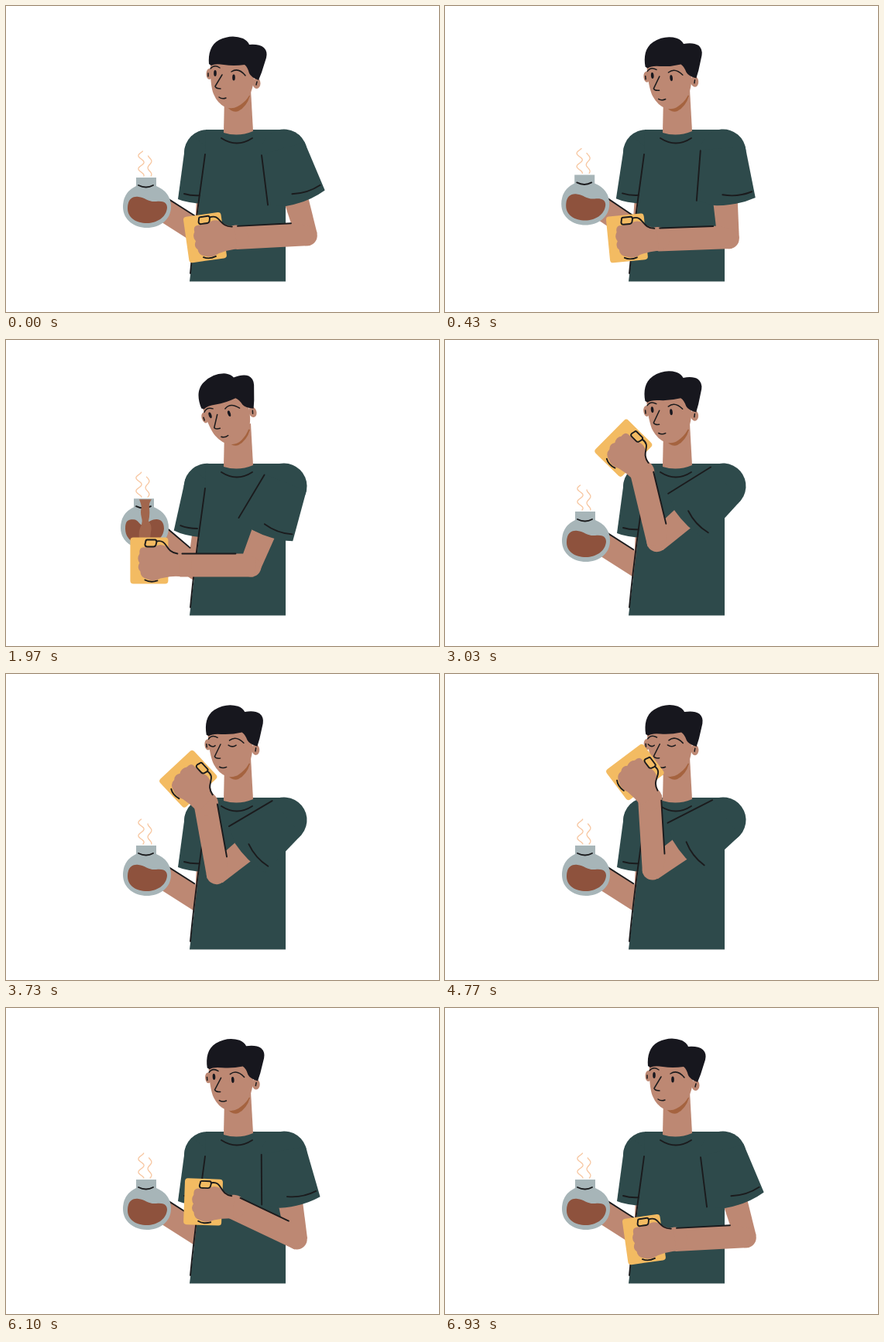
Recreate the animation shown at these times as an HTML page. Size 559 px wide and 396 px high, loop 7010 ms.

```html
<!DOCTYPE html>
<html lang="en">
<head>
<meta charset="utf-8">
<title>Coffee break</title>
<style>
html, body { margin: 0; width: 100%; height: 100%; overflow: hidden; background: #fff; }
svg { display: block; width: 100vw; height: 100vh; }
.skin { fill: #bd8873; }
.shirt { fill: #2e4a4b; }
.hair { fill: #17171e; }
.glass { fill: #a7b5b8; }
.mug { fill: #f3bb62; }
.line { fill: none; stroke: #1b1b1d; stroke-width: 1.9; stroke-linecap: round; stroke-linejoin: round; }
.thin { stroke-width: 1.5; }
.limb { fill: none; stroke: #bd8873; stroke-width: 30; stroke-linecap: round; }
.steam { fill: none; stroke: #f7c6a0; stroke-width: 1.3; stroke-linecap: round; }
</style>
</head>
<body>
<svg viewBox="0 0 559 396">
  <!-- pouring arm -->
  <path id="backUpper" class="limb" style="stroke-width:25"/>
  <g id="backFore">
    <path class="limb" d="M0 -1H72"/>
    <path class="line" d="M24 14H67"/>
  </g>
  <g id="backSleeve">
    <circle class="shirt" cx="260" cy="190" r="30"/>
    <path class="shirt" d="M231 183L222 250Q236 256 262 256L272 192L240 168Z"/>
    <path class="line" d="M230 243Q240 246 252 245"/>
  </g>

  <!-- body -->
  <path class="shirt" d="M258 160H359L361 166V356.500H237L257 192Z"/>
  <path class="line" d="M257 192C252 232 245 272 238 346"/>
  <path class="skin" d="M282 118L316 108L319 162Q300 170 281 164Z"/>
  <path fill="#a5633f" d="M284 129Q292 139 300 136Q311 130 315 116L298 112Z"/>
  <path class="line" d="M278 171Q298 184 318 171"/>

  <!-- head -->
  <g id="head">
    <ellipse class="skin" cx="262.500" cy="88" rx="4" ry="7"/>
    <ellipse class="skin" cx="323.500" cy="100" rx="5" ry="7"/>
    <path class="skin" d="M264 68C263 90 265 107 268 114Q273 126 283 131Q292 134 299 130C310 124 316 116 319 102L324 70Z"/>
    <path class="hair" d="M262 75C261 62 264 50 275 44Q291 36 306 42Q312 45 314 50Q327 49 333 54Q338 59 336 67L330 86L326 96Q316 92 314 87Q312 79 308 76Q294 78 281 76Q270 74 265 77Z"/>
    <path class="line thin" d="M264 81Q269 75 276 80M291 85Q300 79 309 90"/>
    <path class="line thin" d="M279 89L270 104Q271 107 277 107M275 118Q279 121 284 119M323 102L324 98M261 91L261 87"/>
    <g id="open" class="hair">
      <ellipse cx="270" cy="87" rx="1.800" ry="4"/>
      <ellipse cx="294" cy="92.500" rx="1.800" ry="4"/>
    </g>
    <path id="shut" class="line thin" d="M264 88Q268 93 272 90M289 91Q294 95 299 92"/>
  </g>

  <!-- carafe -->
  <g id="carafe">
    <path class="glass" d="M168 222H194V233Q213 241 213 260C213 277 198 287 182 287S151 277 151 260Q151 241 168 233Z"/>
    <path id="liquid" fill="#8e523d"/>
    <path class="line" d="M171 232Q181 237 190 232"/>
    <path id="steamA" class="steam"/>
    <path id="steamB" class="steam"/>
  </g>
  <path id="stream" fill="#a1664d" d="M-8 0H8Q4 6 5 14Q6 24 4 33Q9 40 7 50L6 60H-8Q-9 50 -7 44Q-3 36 -5 28Q-7 20 -5 12Q-6 5 -8 0Z"/>

  <!-- mug arm, pivots at the origin of each group -->
  <g id="upper">
    <path class="skin" d="M-18 58H14L12 113H-16Z"/>
    <circle class="shirt" r="29.500"/>
    <path class="shirt" d="M-29 -5L29 -5L37 62Q12 71 -17 68L-39 60Z"/>
    <path class="line" d="M-29 -4L-39 60M-5 55Q14 60 33 54"/>
  </g>
  <g id="fore">
    <circle class="skin" cx="-1" cy="1" r="13"/>
    <path class="skin" d="M-93 -16H-12L6 -10L2 14H-93Z"/>
    <g id="hand">
      <rect class="mug" x="-64" y="-35" width="49" height="60" rx="4"/>
      <path class="line" d="M-45 20Q-38 24 -29 21"/>
      <circle class="skin" r="15.500"/>
      <path class="skin" d="M-45 -22Q-53 -23 -52 -14Q-56 -8 -52 -2Q-56 4 -51 9Q-51 17 -42 19Q-34 23 -25 18Q-13 15 0 15V-14Q-11 -16 -17 -23Q-26 -28 -32 -23Z"/>
      <path class="line" style="fill:#f3bb62" d="M-42 -32H-32Q-30 -32 -30 -29L-31 -25Q-32 -23 -34 -23H-42Q-45 -23 -45 -26L-44 -30Q-44 -32 -42 -32Z"/>
      <path class="line" d="M-30 -30C-15 -33 -20 -16 -3 -14"/>
    </g>
    <path class="line" d="M-90 -16H-21"/>
  </g>
</svg>
<script>
const LOOP = 7010, FIRST = 100, STEP = 6830 / 98;
const SHOULDER = [359, 189], UPPER = 111.5;
const el = {};
document.querySelectorAll('[id]').forEach(n => el[n.id] = n);
const set = (id, name, value) => el[id].setAttribute(name, value);
const move = (id, value) => set(id, 'transform', value);

// [time, value] keys, eased between neighbours
const tracks = {
  upper: [[100, 16], [850, -21.9], [2370, -21.9], [3080, -49.5], [3400, -49.5], [4450, -54], [5450, -54], [6255, 16]],
  fore: [[100, -3], [850, 0], [2330, 0], [2470, -5], [3080, 78], [3400, 78], [4450, 86.5], [5450, 86.5], [6490, -3]],
  hand: [[100, -8], [850, 0], [2370, 0], [3080, 45.3], [3400, 45.3], [4450, 53], [5450, 53], [6327, -8]],
  head: [[100, 0], [850, -18], [2330, -18], [3080, -5.7], [4600, -4.5], [5800, -4.5], [6770, 0]],
  lift: [[100, 0], [1600, 1], [2270, 0]],
  pour: [[740, 0], [900, 1], [2060, 1], [2260, 0]]
};
const SHUT = [3700, 5150];

const ease = p => (1 - Math.cos(Math.PI * p)) / 2;
function at(name, t) {
  const keys = tracks[name];
  const i = keys.findIndex(k => k[0] > t);
  if (i === 0) return keys[0][1];
  if (i < 0) return keys[keys.length - 1][1];
  const [t0, a] = keys[i - 1], [t1, b] = keys[i];
  return a + (b - a) * ease((t - t0) / (t1 - t0));
}

// point (x, y) turned clockwise by deg
function turn(x, y, deg) {
  const r = deg * Math.PI / 180, c = Math.cos(r), s = Math.sin(r);
  return [x * c - y * s, x * s + y * c];
}

// both outlines have the same commands, so they blend number by number
const still = 'M157 262C157 250 163 246 171 247C180 248 184 254 194 253C204 252 208 255 208 261C207 274 194 281 182 281C168 281 157 274 157 262Z';
const tipped = 'M157 261C157 251 160 249 167 249C175 249 174 257 182 257C190 247 207 244 207 261C206 275 192 283 180 283C168 282 157 274 157 261Z';
function blend(a, b, k) {
  const nums = b.match(/\d+/g);
  let i = 0;
  return a.replace(/\d+/g, n => (+n + (nums[i++] - n) * k).toFixed(2));
}

function wave(x, top, size, phase) {
  let d = '';
  for (let y = top; y <= 220; y++) {
    const dx = size * Math.sin((y - 198) / 17 * 2 * Math.PI + phase);
    d += (d ? 'L' : 'M') + (x + dx).toFixed(2) + ' ' + y;
  }
  return d;
}

function draw(t) {
  // mug arm
  const up = at('upper', t), fore = at('fore', t);
  const [sx, sy] = SHOULDER, [ex, ey] = turn(0, UPPER, -up);
  move('upper', `translate(${sx} ${sy}) rotate(${-up})`);
  move('fore', `translate(${sx + ex} ${sy + ey}) rotate(${fore})`);
  move('hand', `translate(-93 -2) rotate(${at('hand', t) - fore})`);

  // head
  const tilt = at('head', t);
  move('head', `translate(${tilt / 14} ${-tilt / 18}) rotate(${tilt} 297 108)`);
  const shut = t >= SHUT[0] && t < SHUT[1];
  set('open', 'visibility', shut ? 'hidden' : 'visible');
  set('shut', 'visibility', shut ? 'visible' : 'hidden');

  // carafe and the arm holding it
  const u = at('lift', t), pour = at('pour', t), swing = 12.4 * u;
  const cx = -10 * u + 6 * u * u, cy = -43 * u;
  const [bx, by] = turn(-6, 110, swing);
  const x = 262 + bx, y = 186 + by;
  const reach = Math.atan2(257 - 22 * u - y, 195 + cx - x) * 180 / Math.PI;
  set('backUpper', 'd', `M262 186L${x} ${y}`);
  move('backFore', `translate(${x} ${y}) rotate(${reach})`);
  move('backSleeve', `rotate(${swing} 262 186)`);
  move('carafe', `translate(${cx} ${cy})`);
  set('liquid', 'd', blend(still, tipped, pour));

  const full = 257 - 223 - cy;
  const grow = t < 1600 ? pour : 1;
  move('stream', `translate(${183 + cx} ${223 + cy}) scale(1 ${full * grow / 60})`);
  set('stream', 'opacity', t < 1600 ? +(pour > 0) : pour);

  const sway = 0.6 * Math.sin(t / LOOP * 20 * Math.PI);
  set('steamA', 'd', wave(174.5, 188, 3.6, sway));
  set('steamB', 'd', wave(185.5, 194, 2.4, 0.5 - sway));
}

// poses are held for one step each
function tick(now) {
  const t = now % LOOP;
  draw(t < FIRST ? 0 : FIRST + Math.floor((t - FIRST) / STEP + 0.2) * STEP);
  requestAnimationFrame(tick);
}
draw(0);
requestAnimationFrame(tick);
</script>
</body>
</html>
```
